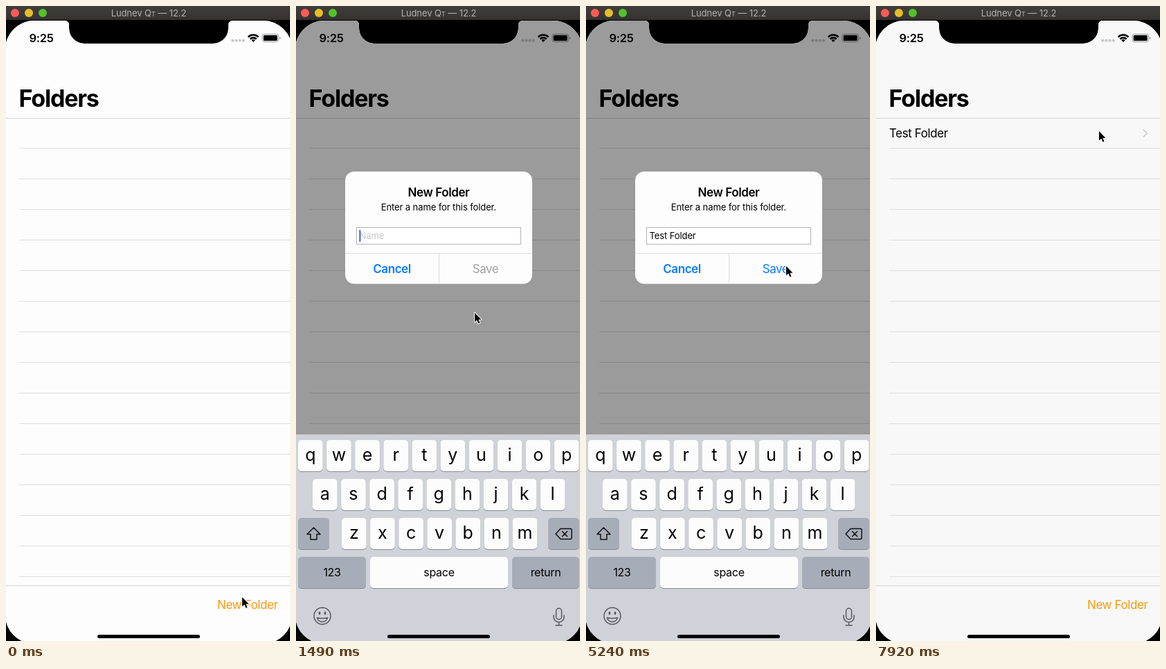
Recreate the animation shown at these times as an HTML page. Size 410 px wide and 913 px high, loop 8000 ms.

```html
<!DOCTYPE html>
<html lang="en">
<head>
<meta charset="utf-8">
<title>New folder</title>
<style>
html, body { margin: 0; width: 100%; height: 100%; overflow: hidden; background: #000; }
svg { display: block; width: 410px; height: 913px; }
text { font-family: Inter, "Open Sans", sans-serif; font-size: 17px; letter-spacing: -.41px; white-space: pre; font-optical-sizing: none; }
.mid { text-anchor: middle; }
.semi { font-weight: 600; }
.small { font-size: 13px; letter-spacing: -.1px; }
.key { font-size: 25px; letter-spacing: 0; }
.word { font-size: 16px; letter-spacing: -.3px; }
.icon { fill: none; stroke: #111; stroke-width: 1.5; stroke-linejoin: round; stroke-linecap: round; }
.gray { stroke: #555960; }
</style>
</head>
<body>
<svg viewBox="0 0 410 913">
  <defs>
    <clipPath id="shape">
      <path d="M-1 62.5A41.5 41.5 0 0 1 40.5 21H85A6 6 0 0 1 91 27V32A22 22 0 0 0 113 54H299A22 22 0 0 0 321 32V27A6 6 0 0 1 327 21H371.5A41.5 41.5 0 0 1 413 62.5V875.5A41.5 41.5 0 0 1 371.5 917H40.5A41.5 41.5 0 0 1 -1 875.5Z"/>
    </clipPath>
    <linearGradient id="chrome" x2="0" y2="1">
      <stop stop-color="#403d3b"/><stop offset="1" stop-color="#353331"/>
    </linearGradient>
  </defs>
  <rect width="410" height="913"/>
  <rect width="410" height="20" fill="url(#chrome)"/>
  <circle cx="13" cy="10" r="6" fill="#fc5b57"/>
  <circle cx="33" cy="10" r="6" fill="#e5bf25"/>
  <circle cx="53" cy="10" r="6" fill="#53c22b"/>
  <text class="small mid" x="206" y="15" fill="#b5b2b0">Ludnev Q<tspan font-size="9.5">T</tspan> — 12.2</text>

  <g clip-path="url(#shape)">
    <rect id="page" y="21" width="410" height="892"/>
    <rect id="nav" y="21" width="410" height="140"/>
    <rect id="bar" y="834" width="410" height="79"/>
    <text x="18.5" y="145" style="font-size:34px;font-weight:700;letter-spacing:-1.2px">Folders</text>
    <text class="semi mid" x="51" y="52" style="font-size:16.5px;letter-spacing:-.3px">9:25</text>
    <g id="dots" fill="#c9c9c9"></g>
    <g fill="none" stroke="#000" stroke-width="2.6">
      <path d="M349.6 44.6A10.4 10.4 0 0 1 364.4 44.6"/>
      <path d="M352.4 47.5A6.6 6.6 0 0 1 361.6 47.5"/>
    </g>
    <path d="M357 52L354.4 49.2A3.8 3.8 0 0 1 359.6 49.2Z"/>
    <rect x="370" y="40.5" width="23.5" height="11" rx="3" fill="none" stroke="#000" stroke-opacity=".4"/>
    <rect x="371.7" y="42" width="20" height="8" rx="1.6"/>
    <path d="M395 44.2A2 2 0 0 1 395 48Z" opacity=".45"/>
    <g id="lines" fill="#dedee0"></g>
    <g id="row">
      <text x="19" y="189">Test Folder</text>
      <path class="icon" d="M386.2 178L391.5 183L386.2 188" style="stroke:#c7c7cc;stroke-width:1.7"/>
    </g>
    <text id="add" x="305" y="867" fill="#f79a12">New Folder</text>
    <rect id="dim" y="21" width="410" height="892"/>

    <g id="alert">
      <rect id="panel" x="71" y="238" width="270" height="161.5" rx="13" fill="#fdfdfd"/>
      <g id="content">
        <text class="semi mid" x="206" y="274">New Folder</text>
        <text class="small mid" x="206" y="294">Enter a name for this folder.</text>
        <rect x="87.5" y="318.5" width="237" height="24" fill="#fff" stroke="#b4b4b4"/>
        <text class="small" id="hint" x="91.5" y="335" fill="#c9c9cd">Name</text>
        <text class="small" id="typed" x="91.5" y="335"></text>
        <rect id="caret" y="322" width="2" height="17" fill="#4262dc"/>
        <path d="M71 355.5H341M206.5 355.5V399.5" stroke="#dcdcde"/>
        <text class="semi mid" x="138.5" y="383.5" fill="#087aff">Cancel</text>
        <text class="mid" id="save" x="273.5" y="383.5">Save</text>
      </g>
    </g>

    <g id="board">
      <rect y="616" width="410" height="310" fill="#cfd2d8"/>
      <g id="keys"></g>
      <path class="icon" d="M25.5 750L35 759.5H30V767H21V759.5H16Z"/>
      <path class="icon" d="M375 759L382 751.5H396Q398 751.5 398 753.5V764.5Q398 766.5 396 766.5H382ZM384.5 755.5L391.5 762.5M391.5 755.5L384.5 762.5"/>
      <g class="icon gray">
        <circle cx="38" cy="877" r="12"/>
        <path d="M30.5 879.5Q38 881.5 45.5 879.5A7.7 7.7 0 0 1 30.5 879.5Z"/>
        <path d="M34 872V874M42 872V874" stroke-width="2.6"/>
        <rect x="375.5" y="866" width="8" height="16" rx="4"/>
        <path d="M372 876V878.5A7.5 7.5 0 0 0 387 878.5V876M379.5 886V890.5M375 890.5H384"/>
      </g>
    </g>
    <rect x="132" y="904" width="148" height="5" rx="2.5"/>
  </g>
  <path id="cursor" d="M0 0V13.5L3.2 10.6L5.3 15.5L7.5 14.6L5.4 9.8H9.5Z" stroke="#fff" stroke-width="2" paint-order="stroke" stroke-linejoin="round"/>
</svg>
<script>
const LOOP = 8000;
const $ = id => document.getElementById(id);

function add(parent, tag, attrs, label) {
  const el = document.createElementNS('http://www.w3.org/2000/svg', tag);
  for (const name in attrs) el.setAttribute(name, attrs[name]);
  if (label) el.textContent = label;
  $(parent).append(el);
}

function key(x, y, width, label, cls = 'key', fill = '#fcfcfd') {
  const box = { x, width, height: 45, rx: 5 };
  add('keys', 'rect', { ...box, y: y + 1, fill: '#888b91' });
  add('keys', 'rect', { ...box, y, fill });
  if (label) {
    const drop = cls === 'key' ? 29.5 : 28;
    add('keys', 'text', { x: x + width / 2, y: y + drop, class: cls + ' mid' }, label);
  }
}

for (const x of [327.2, 332.4, 337.6, 342.8]) add('dots', 'circle', { cx: x, cy: 49.7, r: 2.1 });
for (let y = 204; y <= 820; y += 44) add('lines', 'rect', { x: 19, y, width: 391, height: 1 });
for (const y of [161, 833]) add('lines', 'rect', { x: 0, y, width: 410, height: 1, fill: '#d3d3d5' });

[['qwertyuiop', 3], ['asdfghjkl', 24], ['zxcvbnm', 66]].forEach(([letters, left], r) =>
  [...letters].forEach((c, i) => key(left + i * 41.1, 624 + r * 56, 35.7, c)));
const DARK = '#a7adb8';
key(3, 736, 45, '', 'key', DARK);
key(364, 736, 45, '', 'key', DARK);
key(3, 792, 98, '123', 'word', DARK);
key(107, 792, 199, 'space', 'word');
key(312, 792, 97, 'return', 'word', DARK);

// Each table row: start time, then the values held from there on.
const CURSOR = [
  [0, 341, 850], [150, 334, 857], [300, 327, 864],
  [740, 321, 820], [890, 300, 690], [1040, 270, 500], [1190, 258, 441],
  [4640, 268, 430], [4790, 290, 404], [4940, 301, 384], [5090, 296, 375], [5240, 289, 374],
  [6430, 287, 334], [6580, 288, 316], [6730, 316, 252], [6880, 330, 222], [7030, 333, 205],
  [7780, 331, 190], [7920, 322, 180]
];
const TYPED = [
  [0, 0], [1940, 1], [2390, 2], [2540, 3], [2840, 4], [3290, 5],
  [3740, 6], [3890, 7], [4040, 9], [4340, 10], [4490, 11]
];
const CARET = [[0, 0], [590, 1], [1190, 0], [1490, 1], [5240, 0]];
const SAVE = [[0, '#a0a0a3'], [1940, '#5590d4'], [2090, '#087aff']];
const PAGE = [[0, '#fdfdfd', '#fdfdfd'], [5690, '#fcfcfc', '#f5f5f5'], [5840, '#f8f8f8', '#f8f8f8']];
const TICKS = [[0], [440], [590], [740], [890], [1040]];

const at = (table, t) => table.findLast(row => row[0] <= t);

// Critically damped spring: 1 is fully away, 0 is settled.
function away(t) {
  const a = Math.max(0, (at(TICKS, t)[0] - 330) * 0.0197);
  return (1 + a) * Math.exp(-a);
}

function pose(t) {
  if (t >= 5840) return { lift: 301, scale: 1, shift: 0, panel: 0, content: 0, dim: 0 };
  if (t >= 5690) return { lift: 257, scale: 1, shift: 0, panel: .1, content: .1, dim: .018 };
  const p = away(t);
  return {
    lift: 301 * p, scale: 1 + .2 * p, shift: 150 * p,
    panel: p === 1 ? 0 : 1 - .6 * p, content: 1 - p, dim: .39 * (1 - p)
  };
}

function set(id, attrs) {
  for (const name in attrs) $(id).setAttribute(name, attrs[name]);
}

function draw(t) {
  const s = pose(t);
  const [, page, bars] = at(PAGE, t);
  set('page', { fill: page });
  set('nav', { fill: bars });
  set('bar', { fill: bars });
  set('row', { opacity: t >= 5840 ? 1 : 0 });
  set('add', { opacity: t >= 300 && t < 440 ? .3 : 1 });
  set('dim', { opacity: s.dim });
  set('board', { transform: `translate(0 ${s.lift})` });
  set('alert', { transform: `translate(206 ${318.75 + s.shift}) scale(${s.scale}) translate(-206 -318.75)` });
  set('panel', { opacity: s.panel });
  set('content', { opacity: s.content });

  const text = 'Test Folder'.slice(0, at(TYPED, t)[1]);
  $('typed').textContent = text;
  set('hint', { opacity: text ? 0 : 1 });
  const width = text ? $('typed').getComputedTextLength() : 0;
  set('caret', { x: 91.3 + width, opacity: at(CARET, t)[1] });
  set('save', { fill: at(SAVE, t)[1] });

  const [, x, y] = at(CURSOR, t);
  set('cursor', { transform: `translate(${x} ${y})` });
}

const start = performance.now();
function frame() {
  draw((performance.now() - start) % LOOP);
  requestAnimationFrame(frame);
}
frame();
</script>
</body>
</html>
```
